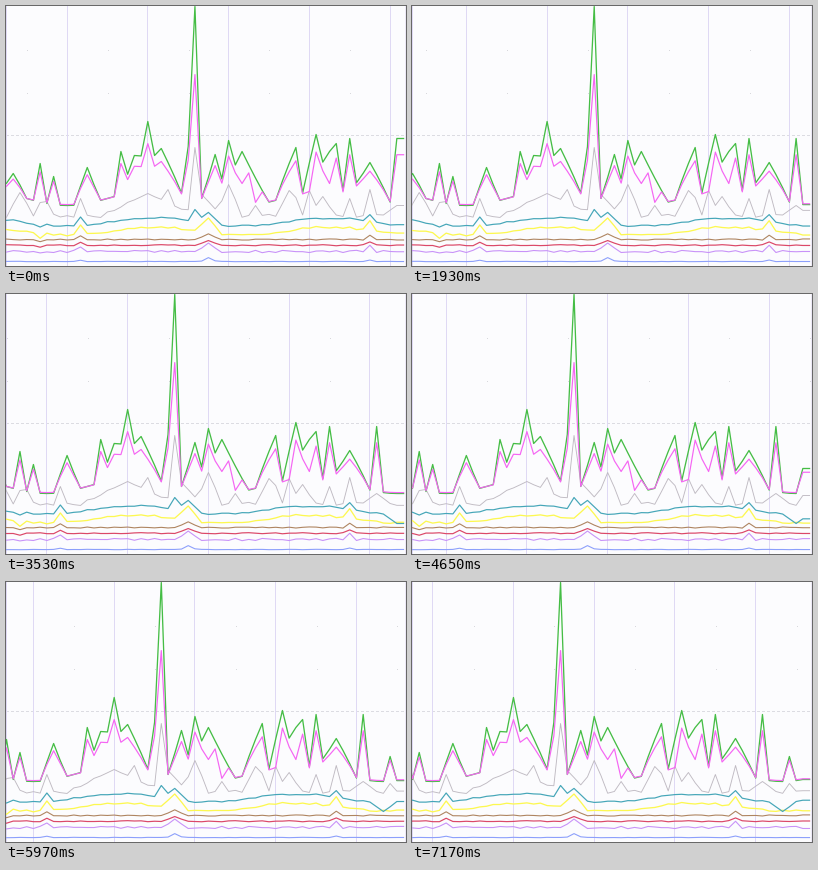
Animation, 400 px wide and 260 px high, one loop 8 s. Source, as a matplotlib script:

```python
import numpy as np
import matplotlib.pyplot as plt
from matplotlib.animation import FuncAnimation

W, H, DPI = 400, 260, 100
TICK, LOOP = 40, 8000            # ms
SHIFTS = (960, 2160, 3400, 4640, 5840, 7040)   # times a new sample arrives
STEP = 6.73                      # px between samples
VISIBLE = 59
TOTAL = VISIBLE + len(SHIFTS)

rng = np.random.default_rng(4)
index = np.arange(TOTAL)
wave = np.cos(2 * np.pi * (index - 9) / 26)


def peaks(base, tents):
    """Straight-sided peaks on a base: {reach: {centre: top}}."""
    swing = np.zeros(TOTAL)
    for reach, tops in tents.items():
        for centre, top in tops.items():
            slope = np.clip(1 - abs(index - centre) / reach, 0, 1)
            part = (top - base) * slope
            swing = np.where(abs(part) > abs(swing), part, swing)
    return base + swing


def jitter(size):
    return rng.uniform(-size, size, TOTAL)


# Heights are px from the top edge. Load bursts show in all the lower series.
burst = peaks(np.zeros(TOTAL), {1: {5: -0.3, 11: 0.7, 54: 0.7}, 2: {30: 1}})

green = peaks(191 + 8 * wave, {
    1: {5: 157, 7: 170, 17: 145, 27: 140, 28: 0, 33: 134, 43: 141, 49: 137,
        51: 132, 58: 132, 62: 174},
    2: {1: 167, 12: 161, 19: 149, 21: 115, 31: 148, 42: 157, 46: 128,
        48: 145},
    3: {23: 142, 54: 156},
    4: {35: 145},
})
pink = 210 - 1.59 * np.maximum(210 - green, 0) ** 0.84
pink[[35, 37, 45, 48]] += 20
grey = peaks(209 + jitter(2), {
    1: {5: 196, 6: 195, 11: 192, 24: 183, 28: 141, 37: 199, 43: 191,
        45: 184, 51: 192, 54: 183, 62: 201},
    2: {2: 186, 33: 178, 42: 184, 47: 190, 58: 199},
    3: {29: 188},
    7: {21: 187},
})
teal = peaks(215.5 + 4 * wave + jitter(1),
             {1: {28: 203}, 2: {61: 229}}) - 11 * burst
yellow = 224.5 + 4 * wave + jitter(1) - 15 * burst
brown = 233 + jitter(0.6) - 6 * burst
red = 238.7 + jitter(0.6) - 5 * burst
purple = 245 + jitter(1.2) - 8 * burst
blue = 255 + jitter(0.2) - 4 * burst ** 3

SERIES = [
    (blue, "#8c9ffb", 1.1),
    (purple, "#c892f8", 1.1),
    (red, "#db4868", 1.2),
    (brown, "#ae8460", 1.1),
    (yellow, "#fcf850", 1.3),
    (teal, "#45a6b8", 1.2),
    (grey, "#bfbac2", 0.9),
    (green, "#45bd45", 1.3),
    (pink, "#f566f3", 1.2),
]
GRID = "#dfd9f4"


def px(width):
    return width * 72 / DPI


fig = plt.figure(figsize=(W / DPI, H / DPI), dpi=DPI, facecolor="#fcfcfe")
ax = fig.add_axes([0, 0, 1, 1])
ax.set_xlim(0, W)
ax.set_ylim(H, 0)
ax.axis("off")


def rule(xs, ys, color=GRID, style="-"):
    return ax.plot(xs, ys, color=color, lw=px(1), ls=style, snap=False,
                   zorder=1)[0]


rule([0, W], [129.5, 129.5], "#dcdce2", (0, (3, 2)))
rule([0.5, 0.5], [0, H])
rule([399.5, 399.5], [0, H], "#ece8f6")

major = np.arange(9, TOTAL + 12, 12)
minor = major - 6
rules = [rule([], []) for _ in major]
dots, = ax.plot([], [], ls="", marker="s", ms=px(1), mew=0,
                color="#d8d8dc", zorder=1)
lines = [ax.plot([], [], color=color, lw=px(width), zorder=2 + n)[0]
         for n, (_, color, width) in enumerate(SERIES)]


def x_at(i, shift):
    return 0.5 + STEP * (i - shift)


def draw(frame):
    shift = sum(frame * TICK >= t for t in SHIFTS)
    for line, x in zip(rules, np.floor(x_at(major, shift)) + 0.5):
        line.set_data([x, x], [0, H])
    xs = np.floor(x_at(minor, shift)) + 0.5
    dots.set_data(np.tile(xs, 2), np.repeat([43.5, 86.5], len(xs)))

    # The newest value is held for one more step.
    count = VISIBLE + shift
    x = x_at(np.arange(count + 1), shift)
    for line, (y, *_) in zip(lines, SERIES):
        line.set_data(x, np.append(y[:count], y[count - 1]) + 0.5)
    return [*rules, dots, *lines]


anim = FuncAnimation(fig, draw, frames=LOOP // TICK, interval=TICK,
                     repeat=True, repeat_delay=0, blit=False)
plt.show()
```
